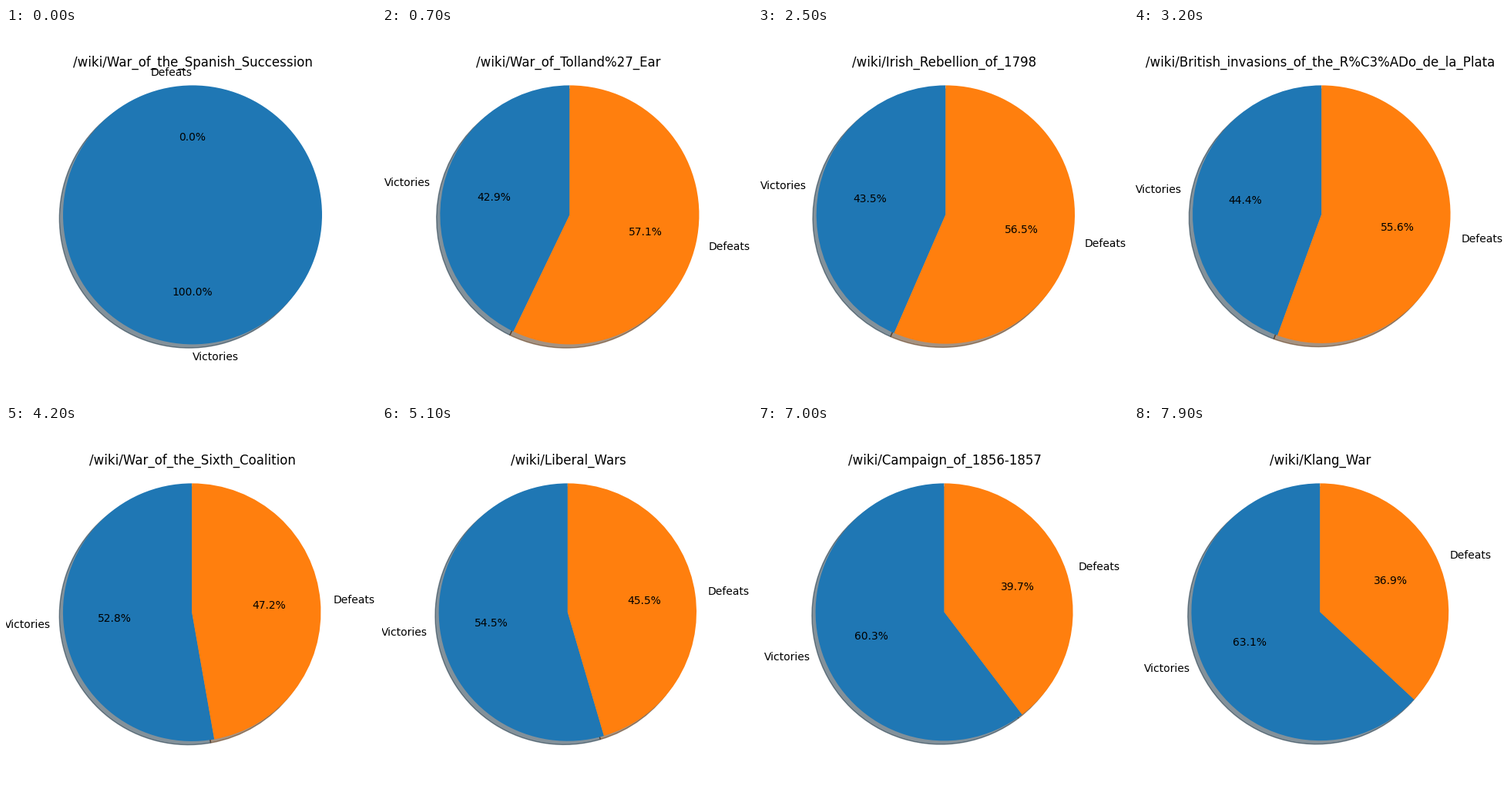
A matplotlib script that plays this animation: 480x480 px, repeating every 8 s.

```python
import numpy as np
import matplotlib.pyplot as plt
from matplotlib.animation import FuncAnimation

SIZE, DPI = 480, 100
CENTER_X, SIDE = 242, 0.77

WARS = """
War_of_the_Spanish_Succession Jacobite_rising_of_1715
War_of_the_Quadruple_Alliance Jacobite_rising_of_1719
Anglo-Spanish_War_(1727) First_Maroon_War Chickasaw_Wars
War_of_Tolland%27_Ear War_of_the_Austrian_Succession
Jacobite_rising_of_1745 Carnatic_Wars Seven_Years%27_War
Anglo-Cherokee_War 1st_Anglo-Mysore_War First_Carib_War
1st_Anglo-Maratha_War American_Revolutionary_War
2nd_Anglo-Mysore_War 3rd_Anglo-Mysore_War Nootka_Crisis
French_Revolutionary_Wars Cotiote_War Second_Maroon_War
Second_Carib_War 4th_Anglo-Mysore_War Irish_Rebellion_of_1798
War_of_the_Second_Coalition Polygar_Wars 2nd_Anglo-Maratha_War
Kandyan_Wars War_of_the_Third_Coalition War_of_the_Fourth_Coalition
British_invasions_of_the_R%C3%ADo_de_la_Plata
Anglo-Turkish_War_(1807%E2%80%931809) Ashanti-Fante_War
Anglo-Russian_War_(1807%E2%80%931812) Gunboat_War Peninsular_War
Anglo-Swedish_War_(1810%E2%80%931812) War_of_the_Fifth_Coalition
Fourth_Xhosa_War War_of_1812 War_of_the_Sixth_Coalition
Anglo-Nepalese_War Hundred_Days Second_Kandyan_War
3rd_Anglo-Maratha_War Fifth_Xhosa_War Greek_War_of_Independence
1st_Anglo-Ashanti_War 1st_Anglo-Burmese_War Liberal_Wars
Black_War Baptist_War Sixth_Xhosa_War First_Carlist_War
Rebellions_of_1837 1st_Anglo-Afghan_War First_Opium_War
Egyptian-Ottoman_War_(1839%E2%80%931841) Uruguayan_Civil_War
Conquest_of_Sindh Gwalior_Campaign 1st_Anglo-Sikh_War
Flagstaff_War Seventh_Xhosa_War 2nd_Anglo-Sikh_War
Eighth_Xhosa_War 2nd_Anglo-Burmese_War Crimean_War
Campaign_of_1856-1857 Anglo-Persian_War Second_Opium_War
Indian_Rebellion_of_1857 First_Taranaki_War Bhutan_War
Shimonoseki_Campaign Second_Taranaki_War
British_Expedition_to_Abyssinia Klang_War
""".split()

# + victory, - defeat, = undecided
OUTCOMES = ("+-+-=+--" "+-+--+-+--" "+-=+-=-+=-+=-=+"
            "++-++=+-+++-+=-++-+" "++-+=+-++=-+=++=+=+" "++=++-=++")
WINS = np.cumsum([o == "+" for o in OUTCOMES])
LOSSES = np.cumsum([o == "-" for o in OUTCOMES])

fig = plt.figure(figsize=(SIZE / DPI, SIZE / DPI), dpi=DPI)
ax = fig.add_axes([CENTER_X / SIZE - SIDE / 2, 0.11, SIDE, SIDE])


def fit_view(wedges):
    """Centre on the wedges' outline points, scaled by height with 5% margins."""
    pts = np.vstack([w.get_path().vertices for w in wedges])
    low, high = pts.min(axis=0), pts.max(axis=0)
    mid = (low + high) / 2
    half = (high[1] - low[1]) / 2 * 1.1
    ax.set_xlim(mid[0] - half, mid[0] + half)
    ax.set_ylim(mid[1] - half, mid[1] + half)


def draw(i):
    ax.clear()
    wedges, _, _ = ax.pie([WINS[i], LOSSES[i]], labels=["Victories", "Defeats"],
                          autopct="%1.1f%%", shadow=True, startangle=90)
    ax.set_aspect("auto")
    fit_view(wedges)
    ax.set_title("/wiki/" + WARS[i], y=1)


anim = FuncAnimation(fig, draw, frames=len(WARS), interval=100, repeat=True)
plt.show()
```
